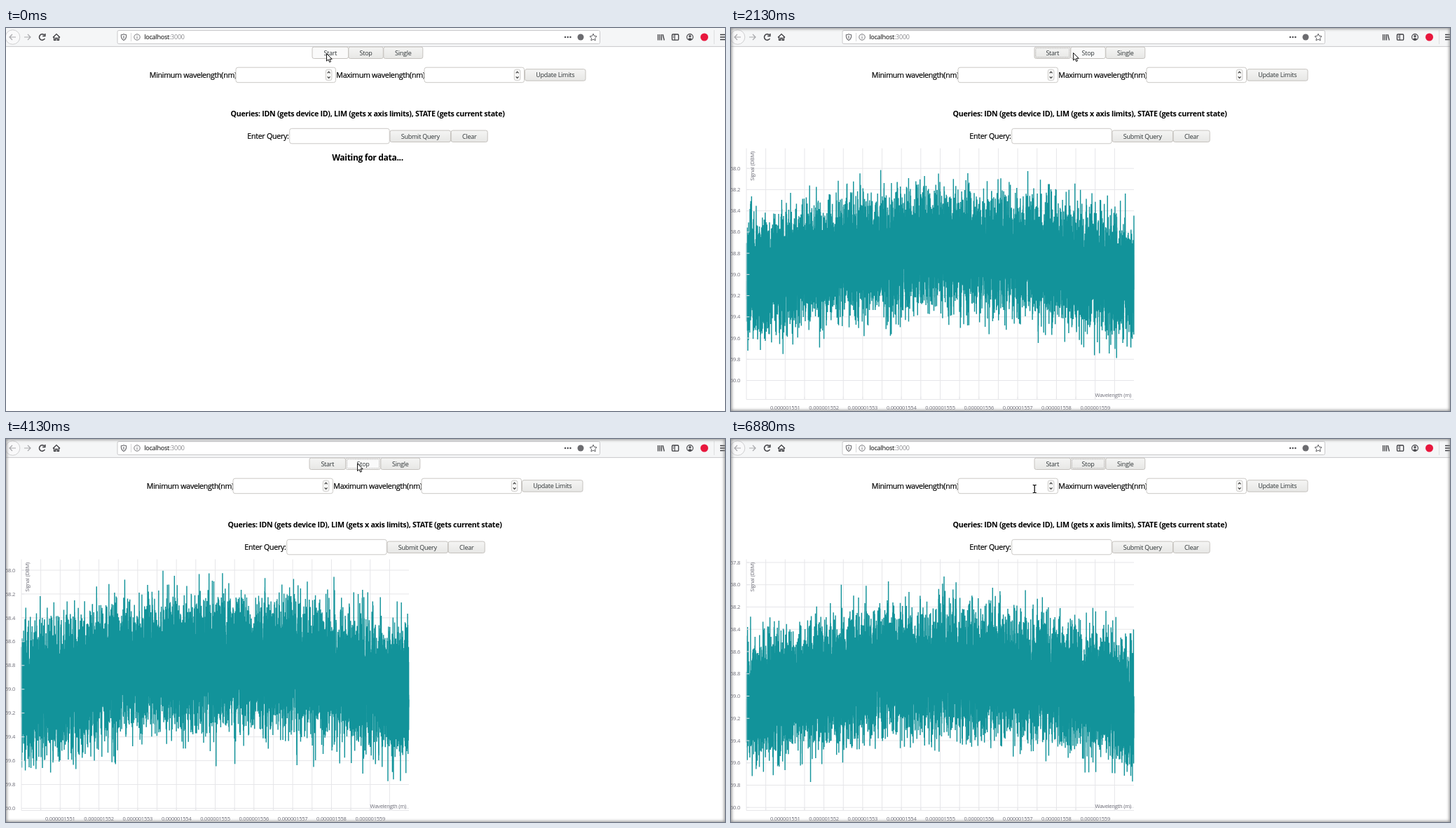
An HTML page that plays this animation: 1026 by 546 pixels, repeating every 8 s.

```html
<!DOCTYPE html>
<html lang="en">
<head>
<meta charset="utf-8">
<title>Spectrum page</title>
<style>
html, body { margin: 0; width: 100%; height: 100%; overflow: hidden; background: #fff; }
svg { display: block; position: absolute; left: 0; top: 0; }
text { font-family: "Open Sans", "Noto Sans", sans-serif; letter-spacing: -.028em; fill: #000; }
.label { font-size: 10.7px; stroke: #000; stroke-width: .2px; }
.bold { font-weight: 700; stroke: none; }
.button { font-size: 9px; fill: #2e3436; text-anchor: middle; }
.axis { font-size: 7.5px; fill: #6b6b76; }
.icon { fill: none; stroke: #3c3c40; stroke-width: 1.3; }
#shade { position: absolute; inset: 0; box-shadow: inset 0 0 4px 1px #8c8c8c; }
</style>
</head>
<body>
<svg id="stage" width="1026" height="546" viewBox="0 0 1026 546">
  <defs>
    <linearGradient id="face" x2="0" y2="1">
      <stop stop-color="#f5f5f4"/><stop offset="1" stop-color="#e7e7e5"/>
    </linearGradient>
    <path id="caret" d="M-2.5 -5.5H-1L0 -4.7L1 -5.5H2.5M0 -4.7V4.7M-2.5 5.5H-1L0 4.7L1 5.5H2.5"/>
  </defs>
  <rect width="1026" height="546" fill="#fff"/>
  <g id="toolbar">
    <rect width="1026" height="26" fill="#f5f6f7"/>
    <path d="M0 26.4H1026" stroke="#c9c9cb"/>
    <rect x="159" y="3.5" width="688.5" height="19" rx="2" fill="#fff" stroke="#c8c8ca"/>
    <circle cx="9.5" cy="13" r="10.3" fill="#f9f9fa" stroke="#cfcfd1"/>
    <g class="icon">
      <path d="M14 13H5M9 9L5 13L9 17M26 13H35M31 9L35 13L31 17" stroke="#a9a9ac" stroke-width="1.2"/>
      <path d="M54.6 10A4.2 4.2 0 1 0 55.4 15M55.8 8V11.6H52.2" stroke-width="1.5"/>
      <path d="M67 13.4L72 8.6L77 13.4M68.6 12.8V17.3H70.8V14.4H73.2V17.3H75.4V12.8" stroke-width="1.4"/>
      <path d="M168 8.8Q170 9.7 171.7 9.7Q172 15.4 168 17.6Q164 15.4 164.3 9.7Q166 9.7 168 8.8ZM168 11V15.3" stroke="#69696d" stroke-width="1.1"/>
      <path d="M178.5 7V19" stroke="#d5d5d7" stroke-width="1"/>
      <circle cx="187" cy="13" r="4.2" stroke="#77777b" stroke-width="1"/>
      <path d="M187 12.3V15.4M187 10.4V11.4" stroke="#77777b" stroke-width="1"/>
      <path d="M838 8.2L839.5 11.4L843 11.9L840.5 14.3L841.1 17.8L838 16.1L834.9 17.8L835.5 14.3L833 11.9L836.5 11.4Z" stroke="#5c5c60" stroke-width="1"/>
      <path d="M930.5 9V17.5M933 9V17.5M935.5 9V17.5M937.3 9.2L939.3 17.5"/>
      <rect x="950.5" y="9" width="9.2" height="8.2" rx="1.2"/>
      <path d="M954.3 9V17.2M952 11.5H953.3M952 13.5H953.3" stroke-width="1"/>
      <circle cx="976" cy="13" r="4.4" stroke-width="1.1"/>
      <path d="M1010.5 3V23" stroke="#dedee0" stroke-width="1"/>
      <path d="M1019 9.5H1026M1019 13H1026M1019 16.5H1026"/>
    </g>
    <g fill="#4a4a4e">
      <circle cx="798" cy="13" r="1.2"/><circle cx="801.7" cy="13" r="1.2"/><circle cx="805.4" cy="13" r="1.2"/>
      <circle cx="820" cy="13" r="4.5" fill="#6b6b6f"/>
      <circle cx="976" cy="11.8" r="1.7"/><path d="M972.8 16Q976 12.6 979.2 16Q976 18.6 972.8 16Z"/>
      <circle cx="996.5" cy="13" r="5.5" fill="#e8173d"/>
    </g>
    <text x="197.3" y="16.3" font-size="9.05">localhost<tspan fill="#8a8a8e">:3000</tspan></text>
  </g>
  <g id="charts"></g>
  <g id="form"></g>
  <path id="arrow" d="M0 0V10.6L2.5 8.4L4.2 12.2L6 11.4L4.3 7.8H7.7Z" fill="#fff" stroke="#111"/>
  <g id="beam" fill="none">
    <use href="#caret" stroke="#fff" stroke-width="2.6"/>
    <use href="#caret" stroke="#111" stroke-width="1.3"/>
  </g>
</svg>
<div id="shade"></div>
<script>
const LOOP = 8000;
const PLOT = { left: 22, right: 575, top: 171.5, bottom: 529.5 };
const $ = id => document.getElementById(id);

function add(parent, tag, attrs, content) {
  const node = document.createElementNS('http://www.w3.org/2000/svg', tag);
  for (const key in attrs) node.setAttribute(key, attrs[key]);
  if (content) node.textContent = content;
  parent.appendChild(node);
  return node;
}

const form = $('form');

function label(x, y, content, cls = 'label', extra = {}) {
  return add(form, 'text', { x, y, class: cls, ...extra }, content);
}

function button(x, y, width, content) {
  const height = 16.5;
  const face = add(form, 'rect', { x, y, width, height, rx: 2.5, stroke: '#c5c2be' });
  const ring = add(form, 'rect', {
    x: x + 1.8, y: y + 1.8, width: width - 3.6, height: height - 3.6, rx: 1.2,
    fill: 'none', stroke: '#aaa8a5', 'stroke-width': .8, 'stroke-dasharray': '1 .7'
  });
  label(x + width / 2, y + 11.6, content, 'button');
  const set = ({ hover, focus } = {}) => {
    face.setAttribute('fill', hover ? '#fafafa' : 'url(#face)');
    ring.setAttribute('visibility', focus ? 'visible' : 'hidden');
  };
  set();
  return set;
}

function field(x, y, spinner) {
  add(form, 'rect', { x, y, width: 142.5, height: 21.5, rx: 3, fill: '#fff', stroke: '#cbc9c6' });
  if (!spinner) return;
  add(form, 'rect', {
    x: x + 128.3, y: y + 3, width: 8.6, height: 15.5, rx: 2.5,
    fill: '#f7f7f6', stroke: '#c9c7c4', 'stroke-width': .9
  });
  const cx = x + 132.6, cy = y + 10.7;
  add(form, 'path', {
    d: `M${cx - 1.9} ${cy - 2.5}l1.9 -2l1.9 2M${cx - 1.9} ${cy + 2.5}l1.9 2l1.9 -2`,
    fill: 'none', stroke: '#333', 'stroke-width': 1.1
  });
}

const setStart = button(437, 27, 51.5, 'Start');
const setStop = button(488.8, 27, 49.5, 'Stop');
button(538.8, 27, 56, 'Single');
label(204.8, 70.5, 'Minimum wavelength(nm)');
field(328, 56.2, true);
label(471.3, 70.5, 'Maximum wavelength(nm)');
field(597, 56.2, true);
button(740.5, 58.7, 86.5, 'Update Limits');
label(516, 126.4, 'Queries: IDN (gets device ID), LIM (gets x axis limits), STATE (gets current state)',
  'label bold', { 'text-anchor': 'middle' });
label(344.3, 158, 'Enter Query:');
field(404.7, 143.3);
button(548, 146, 86.5, 'Submit Query');
button(635.2, 146, 52, 'Clear');
const waiting = label(516, 188.8, 'Waiting for data...', 'bold', { 'text-anchor': 'middle', 'font-size': 12.1 });

function randomFrom(seed) {
  return () => {
    seed = (seed + 0x6D2B79F5) | 0;
    let t = Math.imul(seed ^ seed >>> 15, 1 | seed);
    t = t + Math.imul(t ^ t >>> 7, 61 | t) ^ t;
    return ((t ^ t >>> 14) >>> 0) / 4294967296;
  };
}

// Dense bell-shaped noise around a shallow arch, in dBm below zero.
function signalPath(seed, toY) {
  const rnd = randomFrom(seed), count = 10000;
  const { left, right, top, bottom } = PLOT;
  let d = '';
  for (let i = 0; i <= count; i++) {
    const u = 2 * i / count - 1;
    const noise = rnd() + rnd() + rnd() + rnd() - 2;
    const y = toY(58.77 + .29 * u * u + .46 * noise);
    const x = left + i / count * (right - left);
    d += `${i ? 'L' : 'M'}${x.toFixed(2)} ${Math.min(bottom, Math.max(top, y)).toFixed(1)}`;
  }
  return d;
}

// A chart is set by its noise seed, its top tick value, that tick's height and the tick spacing.
function chart({ seed, first, y0, step }) {
  const { left, right, top, bottom } = PLOT;
  const g = add($('charts'), 'g', {});
  const axisText = (attrs, anchor, content) =>
    add(g, 'text', { class: 'axis', 'text-anchor': anchor, ...attrs }, content);
  const column = 27.65;
  let grid = '', ticks = `M${left} ${top}V${bottom}H${right}`;
  for (let x = left + column; x < right - 1; x += column) {
    grid += `M${x} ${top}V${bottom}`;
    ticks += `M${x} ${bottom - 4}v4`;
  }
  for (let y = y0; y < bottom; y += step) {
    grid += `M${left} ${y}H${right}`;
    ticks += `M${left} ${y}h4.3`;
  }
  const line = { fill: 'none', stroke: '#e6e6e9' };
  add(g, 'path', { d: grid, ...line });
  add(g, 'path', {
    d: signalPath(seed, v => y0 + (v - first) / .2 * step),
    fill: 'none', stroke: '#12939a', 'stroke-width': 1.44
  });
  add(g, 'path', { d: ticks, ...line });
  for (let y = y0, v = first; y < bottom; y += step, v += .2)
    axisText({ x: 13, y: y + 2.6 }, 'end', v.toFixed(1));
  for (let k = 1; k < 10; k++)
    axisText({ x: left + k * column * 2, y: 544 }, 'middle', '0.00000155' + k);
  axisText({ x: 571, y: 526 }, 'end', 'Wavelength (m)');
  axisText({ transform: 'translate(33 176) rotate(-90)' }, 'end', 'Signal (DBM)');
  return g;
}

const charts = [
  { from: 1630, to: 3380, seed: 11, first: 58, y0: 200.2, step: 30.23 },
  { from: 3380, to: 6380, seed: 23, first: 58, y0: 187, step: 33.95 },
  { from: 6380, to: LOOP, seed: 37, first: 57.8, y0: 176, step: 31.75 }
].map(spec => ({ ...spec, node: chart(spec) }));

// The screen refreshes every 125 ms, so each eased move shows in a few steps.
const REFRESH = 125;
const moves = [
  { start: 2130, steps: 3, to: [501.5, 35] },
  { start: 6250, steps: 3, to: [438, 73] },
  { start: 6750, steps: 2, to: [433.2, 71.2] }
];

function pointerAt(t) {
  let pos = [457.5, 36.5];
  for (const { start, steps, to } of moves) {
    if (t < start) break;
    const done = Math.min(1, (Math.floor((t - start) / REFRESH) + 1) / steps);
    const eased = 1 - (1 - done) ** 3;
    pos = pos.map((p, i) => p + (to[i] - p) * eased);
  }
  return pos;
}

const show = (node, on) => node.setAttribute('visibility', on ? 'visible' : 'hidden');

function draw(t) {
  for (const c of charts) c.node.style.display = t >= c.from && t < c.to ? '' : 'none';
  form.setAttribute('transform', `translate(${t < 1630 ? 0 : -4} 0)`);
  show(waiting, t < 1630);
  $('shade').style.opacity = t < 130 ? 0 : t < 250 ? .5 : 1;

  setStart({ hover: t < 2130, focus: t >= 130 && t < 4130 });
  setStop({ hover: t >= 2130 && t < 6380, focus: t >= 4130 });

  const [x, y] = pointerAt(t), inField = t >= 6375;
  for (const id of ['arrow', 'beam']) $(id).setAttribute('transform', `translate(${x} ${y})`);
  show($('arrow'), !inField);
  show($('beam'), inField);
}

const began = performance.now();
function tick() {
  draw((performance.now() - began) % LOOP);
  requestAnimationFrame(tick);
}
tick();
</script>
</body>
</html>
```
